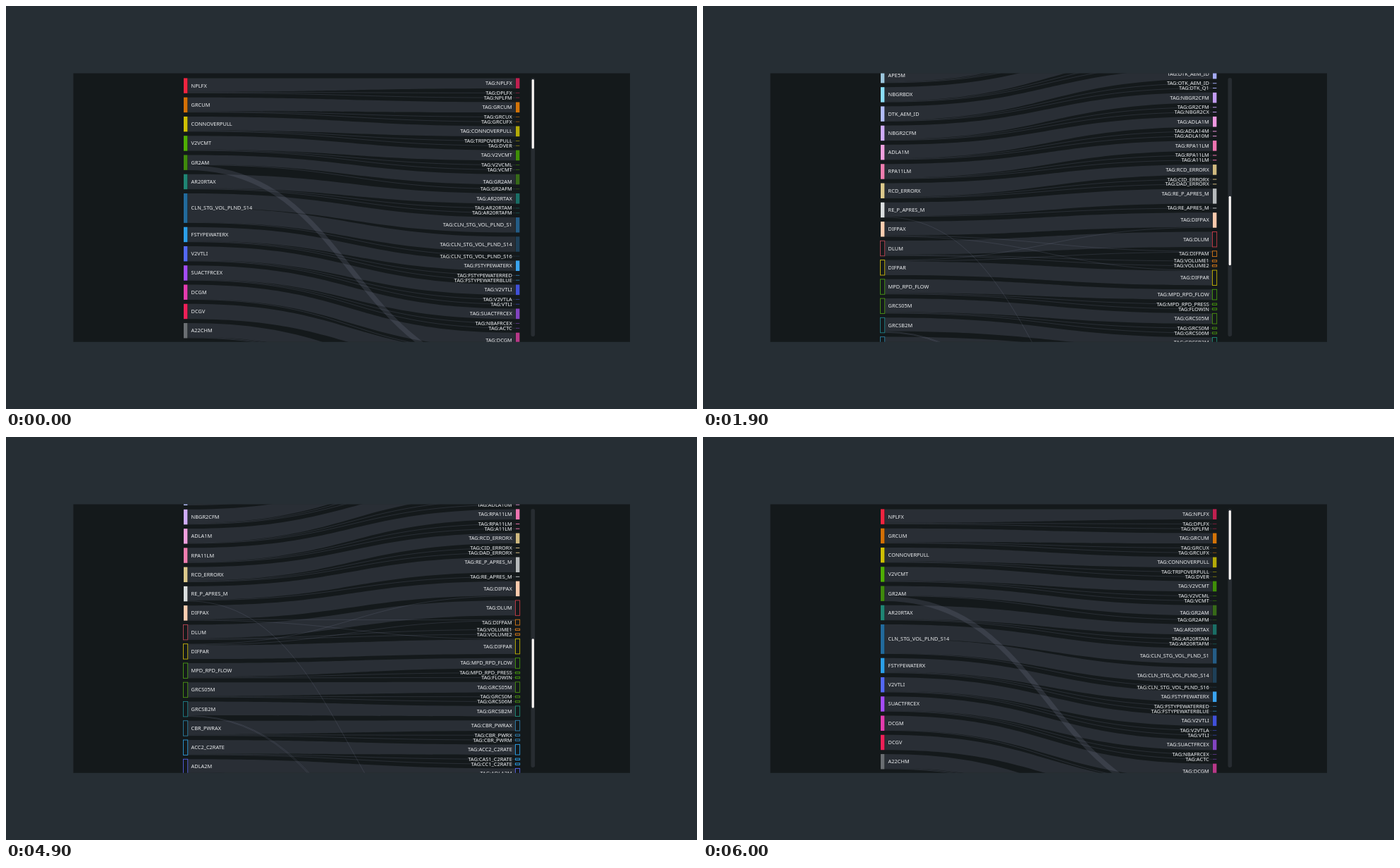
Write an HTML page that moves like this. It is 980 px wide and 572 px high and loops after 7000 ms.

```html
<!DOCTYPE html>
<html lang="en">
<head>
<meta charset="utf-8">
<title>Tag mapping</title>
<style>
html, body { margin: 0; width: 100%; height: 100%; overflow: hidden; background: #262e34; }
svg { display: block; width: 980px; height: 572px; }
text { font: 7.42px "Noto Sans", "Open Sans", sans-serif; fill: #eceef0; }
.band { fill: rgba(126, 130, 153, .2); }
.thread { fill: none; stroke: rgba(126, 130, 153, .2); }
</style>
</head>
<body>
<svg viewBox="0 0 980 572">
  <defs><clipPath id="view"><rect x="95.5" y="95.5" width="789.5" height="381.3"/></clipPath></defs>
  <rect x="95.5" y="95.5" width="789.5" height="381.3" fill="#14191b"/>
  <g clip-path="url(#view)">
    <g id="flows"></g>
    <g id="left"></g>
    <g id="right"></g>
  </g>
  <rect x="744.5" y="102" width="5.6" height="367" rx="2.8" fill="#272c31"/>
  <rect id="thumb" x="745.7" y="104" width="3.2" height="98.5" rx="1.6" fill="#f8f4f2"/>
</svg>
<script>
// Row: source,colour|tags. Tag: name:slots:colour; "-" leaves it unlinked, "~" also dashes it.
const ROWS = `NPLFX,f02440|NPLFX:3:c02050 DPLFX NPLFM
GRCUM,d47006|GRCUM:3:d47408 GRCUX GRCUFX
CONNOVERPULL,cfc004|CONNOVERPULL:3:b4aa08 TRIPOVERPULL DVER
V2VCMT,4fae04|V2VCMT:3:3f8f08 V2VCML VCMT
GR2AM,3f8a0c|GR2AM:3:376a18 GR2AFM
AR20RTAX,1f8574|AR20RTAX:3:1a6e66 AR20RTAM AR20RTAFM
CLN_STG_VOL_PLND_S14,226a9c|CLN_STG_VOL_PLND_S1:4:245c86 CLN_STG_VOL_PLND_S14:4:1e4058 CLN_STG_VOL_PLND_S16
FSTYPEWATERX,2b9fe8|FSTYPEWATERX:3:3aa4f0 FSTYPEWATERRED FSTYPEWATERBLUE
V2VTLI,5468f5|V2VTLI:3:4050d8 V2VTLA VTLI
SUACTFRCEX,a44cf8|SUACTFRCEX:3:8244c0 NBAFRCEX ACTC
DCGM,e43cae|DCGM:4:b83888
DCGV,ee2058|DCGV:4:b81c48 -GR2AX:2:9a7808
A22CHM,6a6e72|A22CHM:3:56595d P22CHM A22CLM
RPAHM,fb8a50|RPAHM:3:d07048 CPAHM RPAHX
H2S4,1f6ba2|UBH2S:4:205a88 H2S_DRILLFLOOR:4:1b3c5e
PUMPPRESS,f79aae|PUMPPRESS:3:f08ea2 CT_PUMPPRESS1 CT_PUMPPRESS4
NBGR2AX,fbc384|NBGR2AX:3:fbbf88 -H2S4:4:152e48 NBGR2AFM
CASPR,f3e66e|CASPR:3:e8d880 SPR2 SPR3
ASU_CURRENT1X,98e75e|ASU_CURRENT1X:3:8eea4c ASU_CURRENT2X ASU_CURRENT3X
DRATA20X,a2d394|DRATA20X:3:9cc890 DRATA20M DRATA20M818
DRH3M,b2dfd8|ADRH3M:4:98c8cc DRH3M:4:6cb8ac DRHX
APE5M,9cc6dc|APE5M:3:98bcd4 APEX APE8M
NBGRBDX,8cdffa|NBGRBDX:3:80cdf6 GRBDX NBGRBX
DTK_AEM_ID,b2bcfa|DTK_AEM_ID:3:a4aaf6 OTK_AEM_ID DTK_Q1
NBGR2CFM,cfacfb|NBGR2CFM:3:c49cf4 GR2CFM NBGR2CX
ADLA1M,f0a0de|ADLA1M:3:ee98e0 ADLA14M ADLA10M
RPA11LM,f07eb0|RPA11LM:3:ee74b0 RPA11LM A11LM
RCD_ERRORX,dcc98c|RCD_ERRORX:3:d0ba80 CID_ERRORX DAD_ERRORX
RE_P_APRES_M,dadedf|RE_P_APRES_M:4:b6babc RE_APRES_M
DIFPAX,fccdb0|DIFPAX:4:fccaac
DLUM,b84453|DLUM:4:c83c48 -DIFPAM:2:d87818 VOLUME1 VOLUME2
DIFPAR,c6b40c|DIFPAR:4:c4b404
MPD_RPD_FLOW,4a9a16|MPD_RPD_FLOW:3:469a0c MPD_RPD_PRESS FLOWIN
GRCS05M,4c9414|GRCS05M:3:488e10 GRCS0M GRCS06M
GRCSB2M,1f7f88|GRCSB2M:3:1e8e7a
CBR_PWRAX,2b7ea0|CBR_PWRAX:3:3080b0 CBR_PWRX CBR_PWRM
ACC2_C2RATE,2e9ad8|ACC2_C2RATE:3:2ca4ee CAS1_C2RATE CC1_C2RATE
ADLA2M,5560e0|ADLA2M:3:5a64f0 ADLA5M ADLA9M
GRBS6M,8d64e0|GRBS6M:4:8c4ce0 BS6M
GRASB0M,b255b8|GRASB0M:4:d04cc0 GRASB7M
NBGMTFX,b0307a|NBGMTFX:3:e02058 MTFX MTFM
HTUPUERRX,b09838|HTUPUERRX:3:c0a030 DLERRX NBERRX
GRAV_RTRNVOL1,6a7c8c|GRAV_RTRNVOL1:2:5a6a8a -APRESM:1:50606a GRAV_RTRNVOL2 GRAV_RTRNVOLTOT
ABDC14X,f2c4a4|ABDC14M:3:f08850 TAG:ABDC14M TAG:ABDC14FM ~TAG:GRCSB0M:1:8a2038 ~TAG:GRCSB7M
GRCSB5M,8a2038|
CT_SPEED,a5613c|CT_SPEED:3:a86c10 TAG:CTSPEED TAG:CT_SPEED_PMIN -GRCSB5M:4:4a1424
UBD_OIL_EXP_PRES,c4b448|UBD_OIL_EXP_PRES:4:9c900c
SBS_MODEX,4a8a20|SBS_MODEX:3:4a8c10 -RASHI:3:3c7a10 FSMODEX SDLMODEX
RAASHM,3c7c20|RAASHM:3:37701c RAASHX
RPASHX,1e7a78|RPASHX:3:147070 RPASHM`;

// Links between rows; width 0 means "fill what is left".
const CROSS = [
  ['GR2AM', 'GR2AX', 7], ['NBGR2AX', 'GR2AX', 7], ['DCGM', 'DCGV', 1], ['H2S4', 'H2S4', 0],
  ['RE_P_APRES_M', 'APRESM', 1], ['UBD_OIL_EXP_PRES', 'APRESM', 1],
  ['DIFPAX', 'DIFPAM', 1], ['DIFPAX', 'DIFPAR', 1], ['DIFPAR', 'DIFPAX', 1], ['DIFPAR', 'DIFPAM', 1],
  ['GRCSB2M', 'TAG:GRCSB0M', 1], ['GRCSB2M', 'TAG:GRCSB7M', 1], ['GRCSB5M', 'GRCSB5M', 0],
  ['GRASB0M', 'RASHI', 1], ['RAASHM', 'RASHI', 7], ['RPASHX', 'RASHI', 7]
];
const TALL = { CLN_STG_VOL_PLND_S14: 7, DRH3M: 7, H2S4: 10 };
const SHIFT = { GR2AM: .5, RE_P_APRES_M: -.5 };

const UNIT = 6.816, TOP = 102.4, STEPS = 16, LOOP = 7000;
const LEFT_STEP = 157 * UNIT / STEPS, RIGHT_STEP = 13 * UNIT, THUMB_STEP = 265 / STEPS;
const X0 = 258, X1 = 722.5, MID = (X0 + X1) / 2;
const $ = id => document.getElementById(id);

function add(parent, tag, attrs, text) {
  const el = document.createElementNS('http://www.w3.org/2000/svg', tag);
  for (const k in attrs) el.setAttribute(k, attrs[k]);
  if (text) el.textContent = text;
  return parent.appendChild(el);
}

const sources = [], tags = [], links = [];
let leftPos = 0, rightPos = 0;

function makeNode(list, name, slots, pos, color, style) {
  const node = { name, slots, color, style, id: list.length, y: TOP + pos * UNIT, h: (slots - 1) * UNIT + 1 };
  list.push(node);
  return node;
}

ROWS.split('\n').forEach((row, i) => {
  const [head, tail] = row.split('|');
  const [name, color] = head.split(',');
  const style = i < 30 ? 'solid' : i < 44 ? 'line' : 'dash';
  const src = makeNode(sources, name, TALL[name] || 4, leftPos, color, style);
  leftPos += src.slots;
  let tint = color;
  for (const part of tail.split(' ').filter(Boolean)) {
    const [, mark, label, size, hex] = part.match(/^([-~]?)(.+?)(?::(\d):(\w{6}))?$/);
    const slots = +(size || 1);
    tint = hex || tint;
    const tag = makeNode(tags, label, slots, rightPos, tint, mark === '~' ? 'dash' : style);
    tag.dim = slots === 1 && i < 14;
    rightPos += slots;
    if (!mark) links.push({ src, tag, w: slots > 1 ? 0 : 1 });
  }
});
for (const [a, b, w] of CROSS) {
  links.push({ src: sources.find(n => n.name === a), tag: tags.find(n => n.name === b), w });
}

// Stack the links of every node along one side.
function stack(nodes, end, other, y, h) {
  for (const node of nodes) {
    const own = links.filter(l => l[end] === node).sort((a, b) => a[other].id - b[other].id);
    const fills = own.filter(l => !l.w).length;
    const rest = (node.h - own.reduce((s, l) => s + l.w, 0)) / fills;
    let at = 0;
    for (const l of own) {
      l[h] = l.w || rest;
      l[y] = node.y + Math.max(0, Math.min(at, node.h - l[h]));
      at += l[h];
    }
  }
}
stack(sources, 'src', 'tag', 'ya', 'ha');
stack(tags, 'tag', 'src', 'yb', 'hb');

function drawNode(group, node, x, textX, anchor, prefix) {
  const color = '#' + node.color;
  if (node.style === 'solid') {
    add(group, 'rect', { x, y: node.y, width: 5.4, height: node.h, fill: color, opacity: node.dim ? .6 : 1 });
  } else {
    const pad = node.slots === 1 ? .7 : 0;
    const box = {
      x: x - .5, y: node.y - pad, width: 6.2, height: node.h + 2 * pad,
      fill: 'none', stroke: color, 'stroke-width': .9
    };
    if (node.style === 'dash') box['stroke-dasharray'] = '1.5 1.2';
    add(group, 'rect', box);
  }
  const mid = node.y + node.h / 2 + (SHIFT[prefix && node.name] || 0) * UNIT;
  add(group, 'text', { x: textX, y: mid + 2.5, 'text-anchor': anchor }, prefix + node.name);
}
for (const n of sources) drawNode($('left'), n, 252, 262.6, 'start', '');
for (const n of tags) drawNode($('right'), n, 723, 717.8, 'end', 'TAG:');
for (const l of links) {
  l.path = add($('flows'), 'path', l.w ? { class: 'thread', 'stroke-width': l.w } : { class: 'band' });
}

const curve = (xa, a, xb, b) => `${xa} ${a}C${MID} ${a} ${MID} ${b} ${xb} ${b}`;

// Fixed widths are stroked along the centre line, the rest are filled bands.
function shape(l, dl, dr) {
  const a = l.ya - dl, b = l.yb - dr;
  if (l.w) return 'M' + curve(X0, a + l.w / 2, X1, b + l.w / 2);
  return `M${curve(X0, a, X1, b)}L${curve(X1, b + l.hb, X0, a + l.ha)}Z`;
}

const clampStep = n => Math.max(0, Math.min(STEPS, n));
function stepAt(t) {
  const since = start => clampStep(Math.floor((t - start) / 100) + 1);
  return since(1000) - since(4500);
}

let shown = -1;
function draw(t) {
  const n = stepAt(t);
  if (n === shown) return;
  shown = n;
  const dl = n * LEFT_STEP, dr = n * RIGHT_STEP;
  $('left').setAttribute('transform', `translate(0 ${-dl})`);
  $('right').setAttribute('transform', `translate(0 ${-dr})`);
  $('thumb').setAttribute('y', 104 + n * THUMB_STEP);
  for (const l of links) l.path.setAttribute('d', shape(l, dl, dr));
}

const begin = performance.now();
function tick() {
  draw((performance.now() - begin) % LOOP);
  requestAnimationFrame(tick);
}
tick();
</script>
</body>
</html>
```
